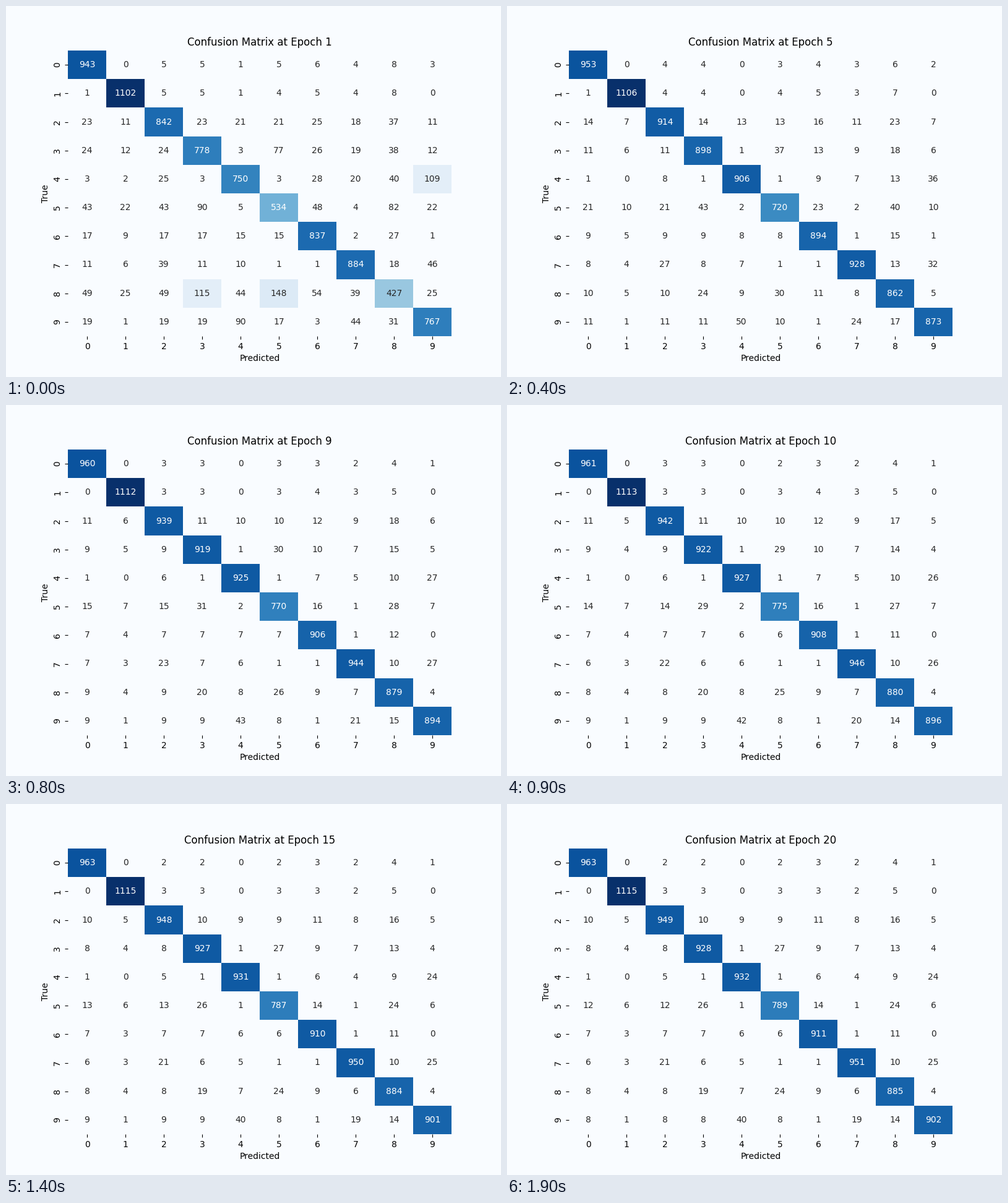
Recreate the animation shown at these times as a matplotlib script. Size 800 by 600 pixels, loop 2000 ms.

```python
import numpy as np
import matplotlib.pyplot as plt
from matplotlib.animation import FuncAnimation

EPOCHS = 20
PAPER = "#f9fcff"

# Samples per class, and hits after the first epoch, the early rise and the end
TOTAL = np.array([980, 1135, 1032, 1010, 982, 892, 958, 1028, 974, 1009])
FIRST = np.array([943, 1102, 842, 778, 750, 534, 837, 884, 427, 767])
EARLY = np.array([944, 1098, 883, 871, 883, 659, 879, 907, 842, 848])
LAST = np.array([963, 1115, 949, 928, 932, 789, 911, 951, 885, 902])
RISE = 3

# How readily each class is guessed by mistake, and which pairs stand out
PULL = [0.10, 0.05, 0.10, 0.10, 0.09, 0.09, 0.11, 0.08, 0.16, 0.05]
ALIKE = {(4, 9): 0.47, (9, 4): 0.37, (3, 5): 0.33, (5, 3): 0.25,
         (8, 5): 0.27, (8, 3): 0.21, (7, 9): 0.32, (7, 2): 0.27,
         (5, 8): 0.23, (9, 7): 0.18}
UNLIKE = [(0, 1), (0, 4), (1, 4), (1, 9), (3, 4), (4, 5), (6, 7), (6, 9), (5, 7)]

# Shares within one band have the same shade; below FAINT a cell is blank
BANDS = [0.12, 0.2, 0.45, 0.6, 0.69, 0.755, 0.816, 0.8555, 0.95]
FAINT = 0.095


def error_shares():
    """Each row: how the mistakes of one true class spread over the guesses."""
    spread = np.tile(PULL, (10, 1))
    np.fill_diagonal(spread, 0)
    for a, b in UNLIKE:
        spread[a, b] *= 0.12
        spread[b, a] *= 0.12
    fixed = np.zeros((10, 10))
    for pair, share in ALIKE.items():
        fixed[pair] = share
        spread[pair] = 0
    rest = 1 - fixed.sum(axis=1, keepdims=True)
    return fixed + spread * rest / spread.sum(axis=1, keepdims=True)


SHARES = error_shares()


def settle(epoch):
    return 1 - np.exp(-max(epoch - RISE, 0) / 3.2)


def matrix_at(epoch):
    rise = min(np.log(epoch) / np.log(RISE), 1)
    late = settle(epoch) / settle(EPOCHS)
    hits = FIRST + (EARLY - FIRST) * rise + (LAST - EARLY) * late
    counts = SHARES * (TOTAL - hits)[:, None]
    np.fill_diagonal(counts, hits)
    return np.rint(counts).astype(int)


def shades(counts):
    share = counts / counts.max()
    band = np.digitize(share, BANDS)
    tone = share.copy()
    for b in np.unique(band):
        group = (band == b) & (share >= FAINT)
        if group.any():
            tone[group] = share[group].mean()
    return np.ma.masked_less(tone, FAINT)


fig, ax = plt.subplots(figsize=(8, 6), dpi=100, facecolor=PAPER)
cmap = plt.get_cmap("Blues").copy()
cmap.set_bad(PAPER)
mesh = ax.pcolormesh(shades(matrix_at(1)), cmap=cmap, vmin=0, vmax=1)

ax.set_facecolor(PAPER)
ax.spines[:].set_visible(False)
ax.set(xlim=(0, 10), ylim=(10, 0), xlabel="Predicted", ylabel="True")
ax.set_xticks(np.arange(10) + 0.5, range(10))
ax.set_yticks(np.arange(10) + 0.5, range(10), rotation="vertical", va="center")
title = ax.set_title("")
labels = [[ax.text(x + 0.5, y + 0.5, "", ha="center", va="center")
           for x in range(10)] for y in range(10)]


def draw(i):
    counts = matrix_at(i + 1)
    mesh.set_array(shades(counts))
    title.set_text(f"Confusion Matrix at Epoch {i + 1}")
    for (y, x), n in np.ndenumerate(counts):
        labels[y][x].set_text(str(n))
        labels[y][x].set_color("w" if n > 0.45 * counts.max() else "0.15")
    return []


anim = FuncAnimation(fig, draw, frames=EPOCHS, interval=100,
                     init_func=lambda: draw(0), repeat=True, repeat_delay=0)
plt.show()
```
